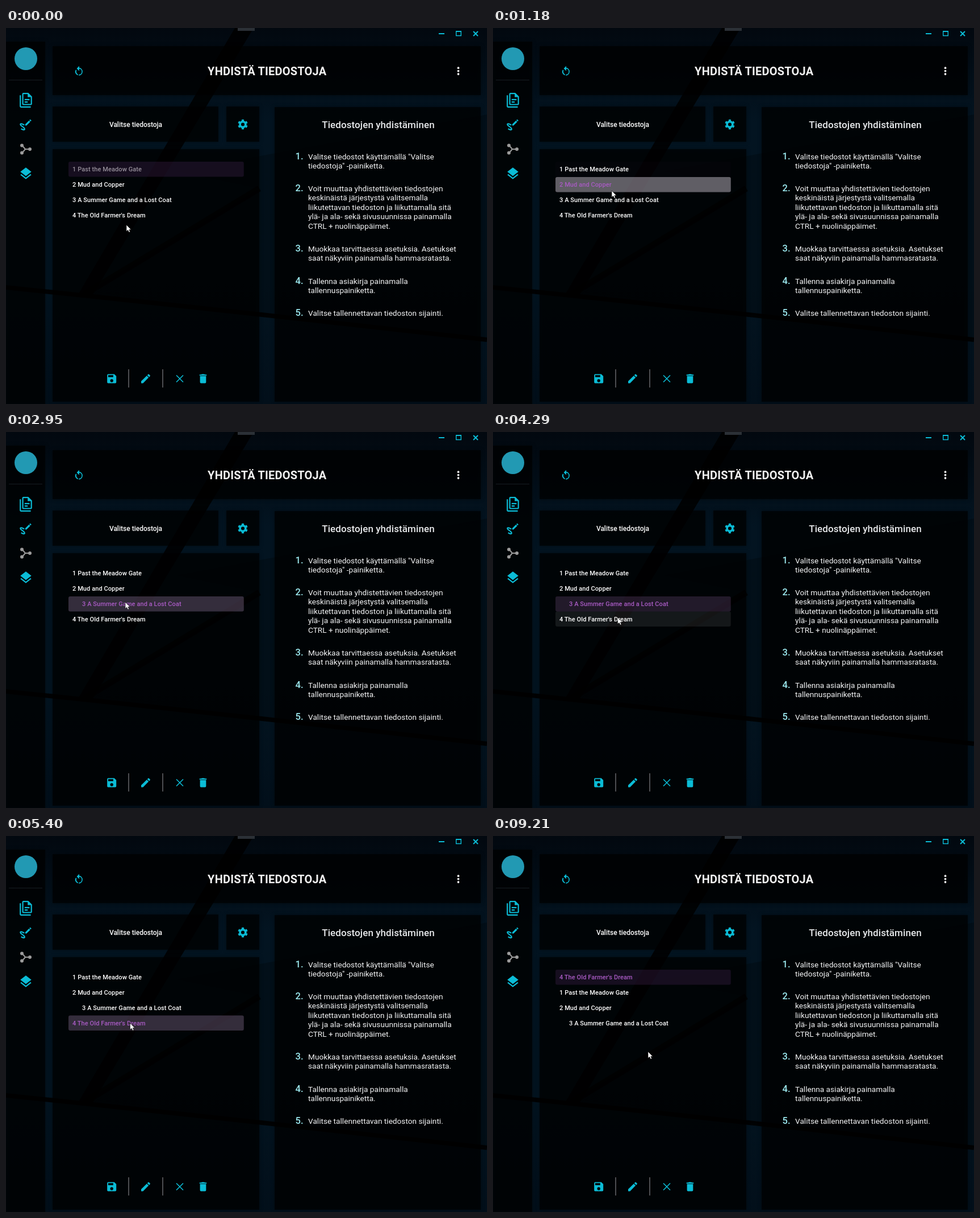
Animation of 847x661 px, one loop 9.28 s. Source, as an HTML page:

```html
<!DOCTYPE html>
<html lang="fi">
<head>
<meta charset="utf-8">
<title>Yhdistä tiedostoja</title>
<style>
html, body { margin: 0; width: 100%; height: 100%; overflow: hidden; background: #01060c; }
svg { display: block; width: 847px; height: 661px; font-family: Roboto, "Noto Sans", sans-serif; }
.cyan { fill: #0bbcd6; }
.line { fill: none; stroke: #0bbcd6; }
.panel { fill: #000; fill-opacity: .66; filter: drop-shadow(0 0 3px rgba(0, 0, 0, .6)); }
.item { font-size: 11px; font-weight: 500; letter-spacing: .08px; }
.body { font-size: 13.66px; fill: #f4f5f6; }
.num { font-size: 16.5px; font-weight: 500; fill: #9ceaf0; }
</style>
</head>
<body>
<svg viewBox="0 0 847 661">
  <defs>
    <linearGradient id="sky" x2="0" y2="1">
      <stop offset="0" stop-color="#02080f"/>
      <stop offset=".25" stop-color="#031421"/>
      <stop offset=".68" stop-color="#031420"/>
      <stop offset="1" stop-color="#020f1a"/>
    </linearGradient>
  </defs>

  <!-- backdrop -->
  <rect width="847" height="661" fill="url(#sky)"/>
  <path d="M300 252L847 152V548L460 505L140 466L446 282Z" fill="#000" opacity=".25"/>
  <path d="M403 0H436L152 470H126Z" fill="#000" opacity=".85"/>
  <path d="M138 468L446 282" stroke="#000" stroke-width="11" opacity=".7"/>
  <path d="M0 456L135 470L460 505L847 548" fill="none" stroke="#000" stroke-width="8" opacity=".9"/>

  <!-- panels -->
  <rect class="panel" y="24" width="69" height="637"/>
  <rect class="panel" x="82" y="32" width="754" height="86"/>
  <rect class="panel" x="82" y="138" width="292" height="62"/>
  <rect class="panel" x="388" y="138" width="58" height="62"/>
  <rect class="panel" x="82" y="213" width="364" height="444"/>
  <rect class="panel" x="473" y="139" width="363" height="518"/>

  <!-- window frame -->
  <rect x="408" width="30" height="5" fill="#2b3036"/>
  <g class="line" stroke-width="2">
    <path d="M762 10H772M823 6L831 14M831 6L823 14"/>
    <path d="M792.7 6V13.5H801.3V6" stroke-width="1.4"/>
    <path d="M792 6H802"/>
  </g>

  <!-- sidebar -->
  <circle cx="35" cy="54" r="20" fill="#2299b3"/>
  <path d="M5 91.5H64" stroke="#171c22"/>
  <g class="cyan">
    <path transform="translate(22 114) scale(1.08)" fill-rule="evenodd" d="M16 0H8A2 2 0 0 0 6 2V18A2 2 0 0 0 8 20H20A2 2 0 0 0 22 18V6ZM20 18H8V2H15V7H20ZM4 4V22H20V24H4A2 2 0 0 1 2 22V4ZM10 10V12H18V10ZM10 14V16H15V14Z"/>
    <path transform="translate(22 243) scale(1.08)" d="M12 16L21 9L12 2L3 9ZM12 18.5L4.6 12.8L3 14.1L12 21.1L21 14.1L19.4 12.8Z"/>
  </g>
  <g transform="translate(22 157.5) scale(1.08)">
    <path class="line" stroke-width="2" d="M9.5 12.1C8 11.200 6 10.200 4.300 10C2.500 10 2.700 12 5 13.600C7.500 15.300 10 17 10 18.800C9.800 20.800 6.500 19.600 4.300 18.200"/>
    <path class="cyan" d="M20.8 5.200C21.100 5 21.100 4.700 20.800 4.500L19.500 3.200C19.300 3 19 3 18.800 3.200L17.700 4.200L19.800 6.300M11 10.900V13H13.100L19.200 6.900L17.100 4.800Z"/>
  </g>
  <g fill="#9b9b9b">
    <path d="M28 206L34 213H42M28 220L34 213" fill="none" stroke="#9b9b9b" stroke-width="2"/>
    <circle cx="28" cy="206.500" r="3"/><circle cx="28" cy="219.500" r="3"/><circle cx="42" cy="213" r="3"/>
  </g>

  <!-- header -->
  <path class="cyan" transform="translate(118.500 66.300) scale(.87)" d="M12 4A8 8 0 0 1 10.900 19.900L11.400 17.900A6 6 0 0 0 12 6V10.600L7 5.600L12 .6ZM6.300 17.600A8 8 0 0 1 5.100 7.900L6.600 9.400A6 6 0 0 0 9.600 17.400L9 19.400A8 8 0 0 1 6.300 17.600Z"/>
  <text x="459.700" y="82.700" text-anchor="middle" font-size="20" font-weight="700" letter-spacing=".2" fill="#f2f2f2">YHDISTÄ TIEDOSTOJA</text>
  <g fill="#f0f0f0"><circle cx="796.500" cy="70.200" r="1.900"/><circle cx="796.500" cy="75.600" r="1.900"/><circle cx="796.500" cy="81" r="1.900"/></g>

  <!-- file controls -->
  <text x="228.500" y="173.500" text-anchor="middle" font-size="12" font-weight="500" fill="#fff">Valitse tiedostoja</text>
  <g class="line" transform="translate(417 169.500)">
    <circle r="4.900" stroke-width="3.700"/>
    <circle r="7.400" stroke-width="2.800" pathLength="12" stroke-dasharray="1 1" stroke-dashoffset="-.5"/>
  </g>
  <g class="cyan">
    <path transform="translate(175.500 605.800) scale(.89)" fill-rule="evenodd" d="M15 9H5V5H15ZM12 19A3 3 0 1 1 12 13A3 3 0 1 1 12 19M17 3H5A2 2 0 0 0 3 5V19A2 2 0 0 0 5 21H19A2 2 0 0 0 21 19V7Z"/>
    <path transform="translate(235.300 605.800) scale(.89)" d="M20.7 7C21.1 6.6 21.1 6 20.7 5.6L18.4 3.3C18 2.9 17.3 2.9 17 3.3L15.1 5.1L18.9 8.9M3 17.2V21H6.8L17.8 9.9L14.1 6.2Z"/>
    <path transform="translate(336.300 605.800) scale(.89)" d="M19 4H15.500L14.500 3H9.500L8.500 4H5V6H19ZM6 19A2 2 0 0 0 8 21H16A2 2 0 0 0 18 19V7H6Z"/>
  </g>
  <path class="line" stroke-width="1.600" d="M300 610.500L312 622.500M312 610.500L300 622.500"/>
  <path d="M216 600V632M276 600V632" stroke="#606164" stroke-width="1.600"/>

  <text x="655.500" y="175.700" text-anchor="middle" font-size="17" font-weight="500" letter-spacing=".08" fill="#e8eaec">Tiedostojen yhdistäminen</text>
  <g id="help"></g>
  <g id="rows"></g>
  <g id="items"></g>
  <path id="cursor" d="M0 0V11.500L2.700 9.200L4.600 13.200L6.600 12.300L4.800 8.400H8.300Z" fill="#fff" stroke="#000" stroke-width=".6"/>
</svg>
<script>
const LOOP = 9280, PITCH = 27, TOP = 235;
const $ = id => document.getElementById(id);

function add(parent, tag, attrs, text = "") {
  const el = document.createElementNS("http://www.w3.org/2000/svg", tag);
  set(el, attrs);
  el.textContent = text;
  return parent.appendChild(el);
}
function set(el, attrs) {
  for (const k in attrs) el.setAttribute(k, attrs[k]);
}
const ramp = (t, a, b) => Math.min(1, Math.max(0, (t - a) / (b - a)));

// Instructions: first baseline, then lines
[
  [230.500, 'Valitse tiedostot käyttämällä "Valitse', "tiedostoja\" -painiketta."],
  [287, "Voit muuttaa yhdistettävien tiedostojen", "keskinäistä järjestystä valitsemalla",
    "liikutettavan tiedoston ja liikuttamalla sitä", "ylä- ja ala- sekä sivusuunnissa painamalla", "CTRL + nuolinäppäimet."],
  [392.500, "Muokkaa tarvittaessa asetuksia. Asetukset", "saat näkyviin painamalla hammasratasta."],
  [449.500, "Tallenna asiakirja painamalla", "tallennuspainiketta."],
  [506, "Valitse tallennettavan tiedoston sijainti."]
].forEach(([y, ...lines], i) => {
  add($("help"), "text", { class: "num", x: 509.500, y: y + .3 }, i + 1 + ".");
  lines.forEach((s, n) => add($("help"), "text", { class: "body", x: 532, y: y + n * 16.450 }, s));
});

const items = [
  "1 Past the Meadow Gate",
  "2 Mud and Copper",
  "3 A Summer Game and a Lost Coat",
  "4 The Old Farmer's Dream"
].map(s => add($("items"), "text", { class: "item" }, s));

const rows = items.map((_, i) => {
  const box = { x: 110, y: TOP + i * PITCH - (i > 2 ? .5 : 0), width: 308.800, height: 26.500, rx: 3 };
  const clip = add($("rows"), "clipPath", { id: "clip" + i });
  add(clip, "rect", box);
  return {
    tint: add($("rows"), "rect", { ...box, fill: "#9c50ba" }),
    light: add($("rows"), "rect", { ...box, fill: "#fff" }),
    ripple: add($("rows"), "circle", { fill: "#fff", "clip-path": `url(#clip${i})` })
  };
});

// Selected row: slot, start, whether by mouse
const picks = [[0, -1e4], [1, 840, true], [2, 1660, true], [3, 4700, true], [1, 6260], [0, 7120]];

// Cursor path: time, x, y
const path = [
  [0, 212, 346], [350, 208, 278], [690, 208, 278], [840, 209, 286], [1200, 209, 286],
  [1530, 210, 299], [4010, 210, 299], [4290, 219.500, 326], [4500, 218.500, 329],
  [8450, 218.500, 329], [9010, 273, 379], [LOOP, 273, 379]
];
function cursorAt(t) {
  const i = path.findIndex(k => k[0] > t);
  const [t0, x0, y0] = path[i - 1], [t1, x1, y1] = path[i];
  const u = ramp(t, t0, t1), e = u * u * (3 - 2 * u);
  return [x0 + (x1 - x0) * e, y0 + (y1 - y0) * e];
}

function draw(t) {
  const [cx, cy] = cursorAt(t);
  set($("cursor"), { transform: `translate(${cx} ${cy})` });
  const hover = Math.floor((cy - TOP) / PITCH);
  const level = rows.map((_, i) => ({ tint: 0, light: i === hover ? .08 : 0, r: 0, glow: 0 }));
  let current = 0;

  picks.forEach(([slot, start, mouse], i) => {
    if (t < start) return;
    const next = picks[i + 1], end = next ? next[1] : Infinity, age = t - start;
    const left = t < end ? 1 : next[2] ? 1 - ramp(t, end, end + 380) : 0;
    if (t < end) current = slot;
    const l = level[slot];
    l.tint = Math.max(l.tint, .14 * left * (mouse ? ramp(age, 200, 400) : 1));
    if (!mouse) return;
    l.light += .05 * left;
    if (age < 690) {
      l.r = 105 * (age / 210) ** 1.6;
      l.glow = .24 * (1 - ramp(age, 490, 690));
    }
  });

  rows.forEach((row, i) => {
    const l = level[i];
    set(row.tint, { "fill-opacity": l.tint });
    set(row.light, { "fill-opacity": l.light });
    set(row.ripple, { cx, cy, r: l.r, "fill-opacity": l.glow });
  });

  const order = t < 6260 ? [0, 1, 2, 3] : t < 7120 ? [0, 3, 1, 2] : [3, 0, 1, 2];
  order.forEach((id, slot) => {
    const child = id === 2 && t >= 2950;
    set(items[id], {
      x: child ? 134 : 117,
      y: 252 + slot * PITCH - (slot > 2 ? .3 : 0),
      fill: slot !== current ? "#fff" : t < 840 ? "#968f9a" : "#a95bc4"
    });
  });
}

function tick() {
  draw(performance.now() % LOOP);
  requestAnimationFrame(tick);
}
tick();
</script>
</body>
</html>
```
